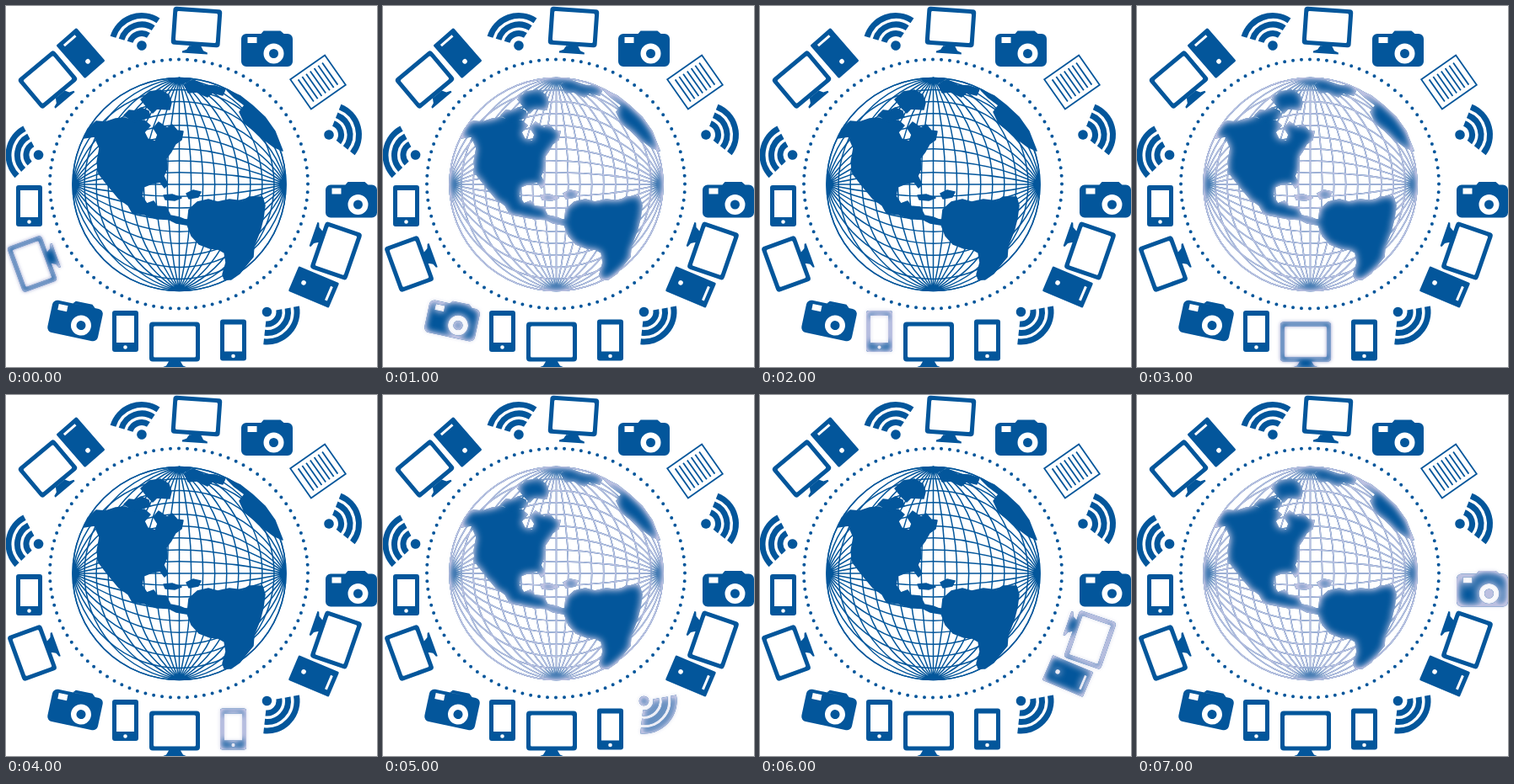
An HTML page for the animation above (8000 ms loop, 440x429 px).

```html
<!DOCTYPE html>
<html lang="en">
<head>
<meta charset="utf-8">
<title>Connected devices</title>
<style>
  html, body { margin: 0; height: 100%; overflow: hidden; background: #fff; }
  svg { display: block; width: 100vw; height: 100vh; }
</style>
</head>
<body>
<svg id="stage" viewBox="0 0 440 429" fill="#03569b" fill-rule="evenodd">
  <defs id="defs"></defs>
  <g id="ring"></g>
  <g id="globe">
    <g id="grid" fill="none" stroke="#03569b" stroke-width="1.5"></g>
    <path id="land" stroke="#03569b" stroke-width="1.5" stroke-linejoin="round" d="
      M92 157L97 146 107 137 118 138 130 134 141 133 153 138 164 136 171 142 164 150 168 158 177 161 180 153 175 145 181 138 191 145 197 141 203 148 210 149 208 159 201 164 196 173 190 181 191 193 187 202 192 212 188 216 183 209 173 211 163 215 161 226 167 235 175 232 179 238 190 239 195 249 205 251 215 255 214 260 202 258 190 252 179 253 165 248 150 246 145 237 134 229 120 212 110 199 108 186 111 169 105 155Z
      M217 242L227 233 240 230 251 233 265 230 281 232 288 227 304 227 307 237 305 252 301 268 294 285 293 298 284 309 277 318 267 325 259 325 257 319 261 305 259 293 252 289 242 288 229 283 220 273 215 260Z
      M160 111L170 102 183 100 193 106 196 115 194 123 179 122 174 127 168 121Z
      M140 130L146 124 155 125 160 121 169 125 171 132 162 134 155 138Z
      M187 225L197 224 208 228 200 231 189 230Z
      M214 223L222 219 231 221 228 227 217 229Z
      M212 94L222 88 234 94 248 95 260 99 257 106 245 103 239 108 226 102 216 103Z
      M262 100L278 107 292 118 307 132 319 149 328 172 317 167 305 158 293 147 283 139 277 126 283 118 271 109Z"/>
  </g>
  <g id="devices"></g>
</svg>
<script>
const byId = id => document.getElementById(id);
const BLUE = '#03569b', GLOW = '#bcc1e1', STEP = 1000;

// Inner glow of the given softness, with an optional halo around the shape
const glow = (id, blur, gain, halo) => `
  <filter id="${id}" filterUnits="userSpaceOnUse" x="-60" y="-60" width="560" height="560"
      color-interpolation-filters="sRGB">
    <feComponentTransfer in="SourceAlpha"><feFuncA type="linear" slope="-1" intercept="1"/></feComponentTransfer>
    <feGaussianBlur stdDeviation="${blur}"/>
    <feComponentTransfer result="edge"><feFuncA type="linear" slope="${gain}"/></feComponentTransfer>
    <feFlood flood-color="${GLOW}"/>
    <feComposite in2="edge" operator="in"/>
    <feComposite in2="SourceAlpha" operator="in" result="inner"/>
    <feGaussianBlur in="SourceAlpha" stdDeviation="2" result="soft"/>
    <feFlood flood-color="#8088c2" flood-opacity="${halo}"/>
    <feComposite in2="soft" operator="in" result="outer"/>
    <feMerge><feMergeNode in="outer"/><feMergeNode in="SourceGraphic"/><feMergeNode in="inner"/></feMerge>
  </filter>`;
byId('defs').innerHTML = glow('globeGlow', 5, 2, 0) + glow('soft', 4, 1.7, .35)
  + glow('wide', 6, 2, .3) + glow('halo', 3, 1.3, .85);

const place = (x, y, turn, body) => `<g transform="translate(${x} ${y}) rotate(${turn})">${body}</g>`;
const box = (x, y, w, h) => `M${x} ${y}h${w}v${h}h${-w}z`;
const disc = (x, y, r) => `M${x - r} ${y}a${r} ${r} 0 1 0 ${2 * r} 0a${r} ${r} 0 1 0 ${-2 * r} 0z`;
const rounded = (w, h, r) =>
  `M${-w / 2 + r} ${-h / 2}h${w - 2 * r}a${r} ${r} 0 0 1 ${r} ${r}v${h - 2 * r}a${r} ${r} 0 0 1 ${-r} ${r}` +
  `h${2 * r - w}a${r} ${r} 0 0 1 ${-r} ${-r}v${2 * r - h}a${r} ${r} 0 0 1 ${r} ${-r}z`;
const path = d => `<path d="${d}"/>`;

const monitor = (x, y, turn, w, h, standX = 0) => place(x, y, turn, path(
  rounded(w, h, 4) + rounded(w - 10, h - 10, 1.5) +
  `M${standX - 7} ${h / 2}h14l3 5 5 2v2h-30v-2l5-2z`));
const tower = (x, y, turn) => place(x, y, turn, path(
  rounded(32, 52, 1.5) + disc(0, 13, 2.8) + box(-9, -21, 18, 3)));
const phone = (x, y) => place(x, y, 0, path(
  rounded(31, 49, 3) + box(-10.5, -18.5, 21, 32) + disc(0, 19, 2.3)));
const camera = (x, y, turn) => place(x, y, turn, path(
  rounded(61, 39, 6) + 'M-7 -19.5l3 -3.5h20l4 3.5z' + box(-23, -15.5, 11, 7) +
  disc(8, 4, 12) + disc(8, 4, 5.5)));
const wifi = (x, y, turn) => {
  const arcs = [14.5, 25, 35.5].map(r => {
    const a = r * Math.cos(.93), b = r * Math.sin(.93);
    return `M${a} ${-b}A${r} ${r} 0 0 1 ${a} ${b}`;
  }).join('');
  return place(x, y, turn, path(disc(0, 0, 5.8)) +
    `<path d="${arcs}" fill="none" stroke="${BLUE}" stroke-width="7"/>`);
};
const page = (x, y, turn) => {
  let lines = box(-25, -21.5, 50, 43);
  for (let i = -3; i <= 3; i++) lines += `M${i * 5.8} -16v32`;
  return place(x, y, turn, `<path d="${lines}" fill="none" stroke="${BLUE}" stroke-width="1.8"/>`);
};

// Devices that light up, one per step
const lit = [
  [monitor(31, 306.5, -110, 57, 43), 'halo'],
  [camera(82, 374, 12), 'soft'],
  [phone(141.5, 386.5), 'soft'],
  [monitor(200, 399, 0, 60, 47), 'halo'],
  [phone(269.5, 397), 'soft'],
  [wifi(309.5, 363.5, 43), 'soft'],
  [monitor(391.5, 291, 109, 59, 46, -10) + tower(365, 334, 113), 'soft'],
  [camera(409.5, 232, 0), 'wide']
];
const still = [
  monitor(49.5, 87.5, -40, 56, 46), tower(88.5, 56, -41), monitor(226, 25, 4, 58, 45),
  camera(309.5, 52.5, 0), page(370, 90.5, -35), phone(27.5, 237.5),
  wifi(161, 47, -110), wifi(38.5, 177, -171), wifi(383, 153, -15)
];
byId('devices').innerHTML = still.join('') + lit.map(([body]) => `<g class="lit">${body}</g>`).join('');

// Dotted ring
const DOTS = 96;
byId('ring').innerHTML = path(Array.from({ length: DOTS }, (_, i) => {
  const a = i / DOTS * 2 * Math.PI;
  return disc(205 + 153 * Math.cos(a), 211.5 + 148 * Math.sin(a), 2);
}).join(''));

// Two families of circular arcs, meeting at top and bottom and at left and right
const CX = 205.5, CY = 212, R = 126.5, ARCS = 9;
let arcs = `M0 ${-R}V${R}`;
for (let i = 1; i <= ARCS; i++) {
  const x = R * i / ARCS, r = (x * x + R * R) / (2 * x);
  for (const sweep of [0, 1]) arcs += `M0 ${-R}A${r} ${r} 0 0 ${sweep} 0 ${R}`;
}
byId('grid').innerHTML = [0, 90].map(turn => place(CX, CY, turn, path(arcs))).join('');

const groups = document.querySelectorAll('.lit');
let shown = -1;
function draw() {
  const step = Math.floor(performance.now() / STEP) % lit.length;
  if (step !== shown) {
    groups.forEach((g, i) => g.setAttribute('filter', i === step ? `url(#${lit[i][1]})` : 'none'));
    byId('globe').setAttribute('filter', step % 2 ? 'url(#globeGlow)' : 'none');
    shown = step;
  }
  requestAnimationFrame(draw);
}
draw();
</script>
</body>
</html>
```
